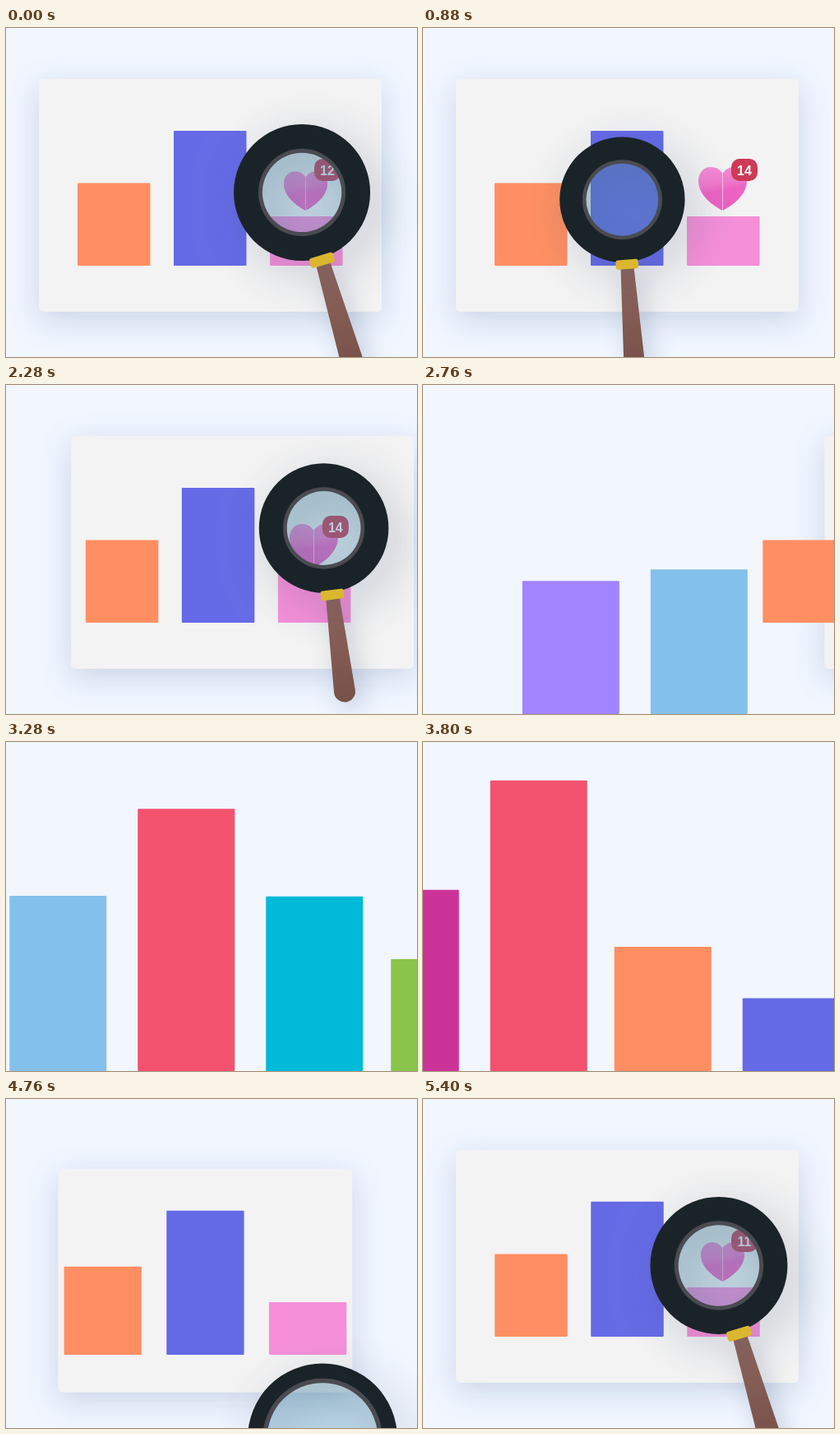
An HTML page with a canvas for the animation above (5.44 s loop, 500 by 400 pixels).

```html
<!DOCTYPE html>
<html lang="en">
<head>
<meta charset="utf-8">
<title>Chart under a magnifier</title>
<style>
  html, body { margin: 0; width: 100%; height: 100%; overflow: hidden; background: #f1f6ff; }
  canvas { display: block; }
</style>
</head>
<body>
<canvas id="stage" width="500" height="400"></canvas>
<script>
const ctx = document.getElementById('stage').getContext('2d');
const LOOP = 5440;
const ORANGE = '#ff8f62', BLUE = '#656ae6', PINK = '#f58fd8', RED = '#f3526f';

// offset along the row, colour, settled height, moment it starts to rise
const row = [
  [0, '#a184ff', 150, 2560],
  [156, '#84c0ec', 213, 2641],
  [312, RED, 318, 3112],
  [468, '#00bad7', 256, 3160],
  [620, '#8ac44a', 242, 3210],
  [776, '#cc3399', 220, 3260],
  [932, RED, 318, 3410],
  [1083, ORANGE, 134, 3569],
  [1239, BLUE, 219, 3753],
  [1395, PINK, 80, 3840]
];

// magnifier: time, x, y, radius, glass ratio, handle angle in degrees
const lensPath = [
  [-960, 385, 530, 96, .82, 12],
  [-680, 385, 413, 91, .80, 14],
  [-320, 394, 184, 87, .68, 16],
  [-150, 368, 203, 84, .655, 16.5],
  [-40, 360, 202.5, 83.5, .65, 16.5],
  [0, 360, 200, 83, .64, 16.5],
  [380, 396, 196, 82, .64, 17],
  [620, 386, 206, 79, .64, 15],
  [1120, 128, 207, 74, .635, -6],
  [1720, 124, 184, 71, .63, -23.5],
  [2000, 215, 160, 76, .63, -6],
  [2300, 400, 175, 79, .63, 8],
  [2600, 640, 190, 82, .63, 16]
];

const clamp = v => Math.max(0, Math.min(1, v));
const span = (t, a, b) => clamp((t - a) / (b - a));
const lerp = (a, b, k) => a + (b - a) * k;
const inOut = u => u < .5 ? 4 * u ** 3 : 1 - 4 * (1 - u) ** 3;
const overshoot = u => 1 - 3.27 * (1 - u) ** 3 + 2.27 * (1 - u) ** 2;

// smooth curve through the keys
function follow(keys, t) {
  let i = 0;
  while (i < keys.length - 2 && t >= keys[i + 1][0]) i++;
  const a = keys[i], b = keys[i + 1], h = b[0] - a[0];
  const before = keys[i - 1] || a, after = keys[i + 2] || b;
  const u = clamp((t - a[0]) / h);
  return a.slice(1).map((v, n) => {
    const k = n + 1;
    const m0 = h * (b[k] - before[k]) / (b[0] - before[0]);
    const m1 = h * (after[k] - a[k]) / (after[0] - a[0]);
    return v * (1 + 2 * u) * (1 - u) ** 2 + m0 * u * (1 - u) ** 2
      + b[k] * u * u * (3 - 2 * u) + m1 * u * u * (u - 1);
  });
}

function shadow(color, blur, x, y) {
  ctx.shadowColor = color;
  ctx.shadowBlur = blur;
  ctx.shadowOffsetX = x;
  ctx.shadowOffsetY = y;
}

function box(x, y, w, h, r, color) {
  ctx.fillStyle = color;
  ctx.beginPath();
  ctx.roundRect(x, y, w, h, r);
  ctx.fill();
}

function disc(r, color) {
  ctx.fillStyle = color;
  ctx.beginPath();
  ctx.arc(0, 0, r, 0, 7);
  ctx.fill();
}

function ring(outer, inner, color) {
  ctx.fillStyle = color;
  ctx.beginPath();
  ctx.arc(0, 0, outer, 0, 2 * Math.PI);
  ctx.arc(0, 0, inner, 0, 2 * Math.PI, true);
  ctx.fill();
}

function card(cx, cy, w, h, alpha) {
  ctx.save();
  ctx.globalAlpha = alpha;
  shadow('rgba(110,135,175,.3)', 36, 0, 10);
  box(cx - w / 2, cy - h / 2, w, h, 5, '#f3f3f3');
  ctx.restore();
}

function drawRow(t) {
  const zoom = inOut(span(t, 4400, 4970));
  const scale = lerp(1, .75, zoom), base = lerp(400, 289, zoom);
  const left = 132.7 - 1197 * inOut(span(t, 2485, 4525));
  const mid = left + 1298 + 14.8 * zoom ** 2.4;
  if (zoom) {
    card(mid, lerp(291, 203.5, zoom), lerp(117, 417, zoom), lerp(228, 283, zoom), clamp(zoom * 2));
  }
  row.forEach(([x, color, height, start], i) => {
    if (t < start || (t > 4400 && i < 7)) return;
    const h = height * overshoot(span(t, start, start + 550)) * scale;
    if (h > 0) box(mid + (x - 1298) * scale, base - h, 118 * scale, h, 1, color);
  });
}

function drawChart(t) {
  const slide = start => 447 * (Math.max(0, t - start) / 680) ** 2;
  card(248.5 + slide(2080), 203.5, 417, 283, 1);
  const dx = slide(2180);
  [[87, 100.5, ORANGE], [204, 164, BLUE], [321, 60, PINK]].forEach(([x, h, color]) =>
    box(x + dx, 289 - h, 88.5, h, 1, color));
  return dx;
}

function heart(x, size) {
  ctx.save();
  ctx.translate(x, 222);
  ctx.scale(size, size);
  const g = ctx.createLinearGradient(-6, -53, 4, 0);
  g.addColorStop(0, '#f58ad6');
  g.addColorStop(.35, '#f07acd');
  g.addColorStop(.55, '#ee63c4');
  g.addColorStop(1, '#ec60c1');
  ctx.fillStyle = g;
  ctx.beginPath();
  ctx.moveTo(0, 0);
  for (const s of [-1, 1]) {
    ctx.moveTo(0, 0);
    ctx.bezierCurveTo(s * 10, -5, s * 29.5, -18, s * 29.5, -36);
    ctx.bezierCurveTo(s * 29.5, -46, s * 23, -53, s * 14.5, -53);
    ctx.bezierCurveTo(s * 8, -53, s * 3, -50, 0, -45);
    ctx.lineTo(-s * .3, -45);
    ctx.lineTo(-s * .3, 0);
  }
  ctx.fill();
  ctx.restore();
}

// time here runs from below zero, before the loop seam, to the exit
function likes(t, dx) {
  const pop = span(t, -330, -170);
  if (!pop) return;
  heart(364.5 + dx, pop * lerp(.9, 1, inOut(span(t, 100, 500))));
  const count = 10 + [-210, 0, 340, 700].filter(start => t >= start).length;
  ctx.save();
  ctx.translate(391 + dx, 172.5);
  ctx.scale(pop, pop);
  box(-16, -13.5, 32, 27, 10, '#cc3a55');
  ctx.fillStyle = '#fff';
  ctx.font = 'bold 16px "Liberation Sans", Arial, sans-serif';
  ctx.textAlign = 'center';
  ctx.fillText(count, 0, 6);
  ctx.restore();
}

function magnifier(t) {
  const [x, y, r, ratio, angle] = follow(lensPath, t);
  const inner = r * ratio, glass = inner - r * .06;
  ctx.save();
  ctx.translate(x, y);

  ctx.save();
  ctx.rotate(-angle * Math.PI / 180);
  shadow('rgba(50,70,110,.25)', 30, 8, 10);
  const wood = ctx.createLinearGradient(0, r, 0, 2.7 * r);
  wood.addColorStop(0, '#8f655c');
  wood.addColorStop(1, '#77514a');
  ctx.fillStyle = wood;
  ctx.beginPath();
  ctx.moveTo(-.105 * r, 1.08 * r);
  ctx.lineTo(-.165 * r, 2.54 * r);
  ctx.arc(0, 2.54 * r, .165 * r, Math.PI, 0, true);
  ctx.lineTo(.105 * r, 1.08 * r);
  ctx.fill();
  ctx.restore();

  const tint = ctx.createLinearGradient(0, -glass, 0, glass);
  tint.addColorStop(0, 'rgba(80,148,170,.37)');
  tint.addColorStop(1, 'rgba(80,148,185,.29)');
  disc(glass + 1, tint);

  ctx.save();
  shadow('rgba(50,70,110,.3)', 55, 12, 14);
  ring(r, inner - 1, '#1a2428');
  ctx.restore();
  ring(inner, glass, '#4a4b50');

  ctx.rotate(-angle * Math.PI / 180);
  box(-.18 * r, .96 * r, .36 * r, .15 * r, .04 * r, '#dbb72f');
  ctx.restore();
}

function draw(now) {
  const t = now % LOOP;
  const lensTime = t > 3500 ? t - LOOP : t;
  ctx.fillStyle = '#f1f6ff';
  ctx.fillRect(0, 0, 500, 400);
  const dx = t < 3000 ? drawChart(t) : 0;
  if (t > 2500) drawRow(t);
  if (t < 3000 || t > 5000) likes(lensTime, dx);
  if (lensTime > -960 && lensTime < 2600) magnifier(lensTime);
}

const begin = performance.now();
function tick() {
  draw(performance.now() - begin);
  requestAnimationFrame(tick);
}
tick();
</script>
</body>
</html>
```
